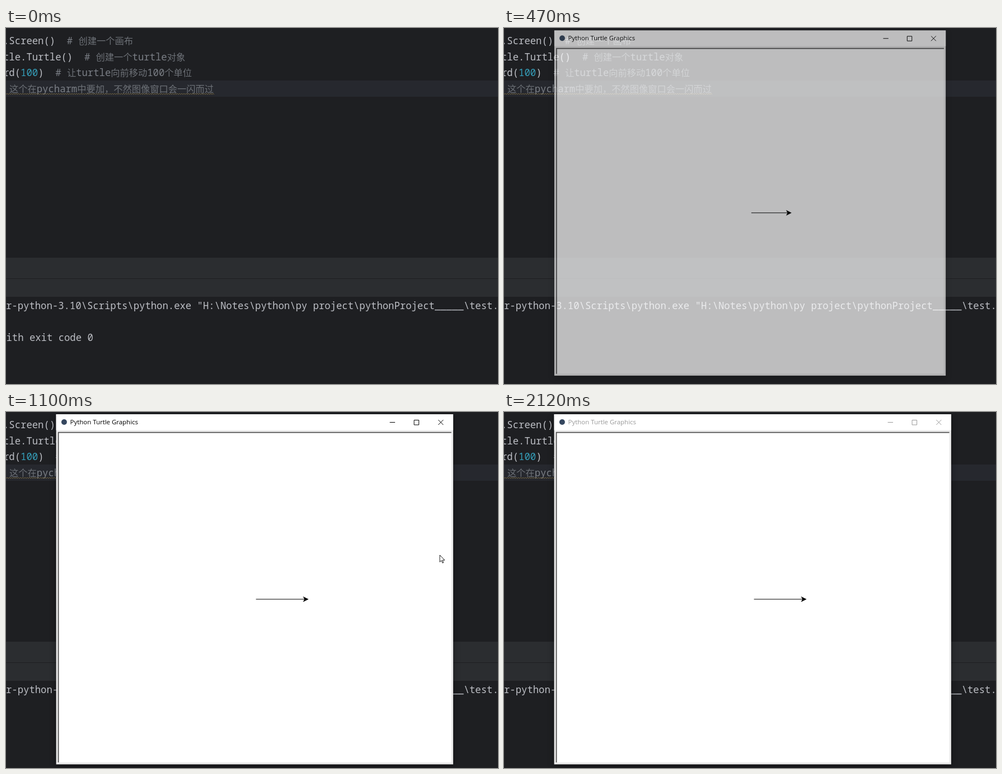
These frames come from a looping animation (879x637 px, 2.19 s). An HTML page:

```html
<!DOCTYPE html>
<html lang="zh">
<head>
<meta charset="utf-8">
<title>Turtle demo</title>
<style>
  html, body { margin: 0; width: 100%; height: 100%; overflow: hidden; background: #1e1f22; }
  svg { display: block; }
  text { white-space: pre; }
  .code { font: 17.25px "Noto Sans Mono", "DejaVu Sans Mono", monospace; fill: #bcbec4; }
  .note { fill: #7a7e85; }
  .zh { font: 300 16.25px "Noto Sans CJK SC", "Noto Sans CJK", sans-serif; fill: #6c7076; }
  .num { fill: #359fba; }
  .title { font: 11.45px "Open Sans", "Noto Sans", sans-serif; }
  #back { filter: drop-shadow(0 4px 6px rgba(0, 0, 0, .4)); }
</style>
</head>
<body>
<svg width="879" height="637" viewBox="0 0 879 637">
  <rect width="879" height="637" fill="#1e1f22"/>
  <rect y="94" width="879" height="29" fill="#26282e"/>
  <rect y="411" width="879" height="70" fill="#2b2d30"/>
  <rect y="448" width="879" height="1" fill="#1e1f22"/>

  <g class="code">
    <text x="-5" y="29">.Screen()  <tspan class="note"># <tspan class="zh">创建一个画布</tspan></tspan></text>
    <text x="-5" y="57.6">tle.Turtle()  <tspan class="note"># <tspan class="zh">创建一个</tspan>turtle<tspan class="zh">对象</tspan></tspan></text>
    <text x="-5" y="86">rd(<tspan class="num">100</tspan>)  <tspan class="note"># <tspan class="zh">让</tspan>turtle<tspan class="zh">向前移动</tspan>100<tspan class="zh">个单位</tspan></tspan></text>
    <text x="6" y="114.7" class="note"><tspan class="zh">这个在</tspan>pycharm<tspan class="zh">中要加，不然图像窗口会一闪而过</tspan></text>
    <text x="0" y="502.6">r-python-3.10\Scripts\python.exe "H:\Notes\python\py project\pythonProject_____\test.py"</text>
    <text x="0.5" y="560" id="exit">ith exit code 0</text>
  </g>
  <path id="wave" fill="none" stroke="#857042" stroke-width=".8"/>

  <g id="win">
    <rect id="back" width="709.3" height="626.5" fill="#ececec"/>
    <rect width="709.3" height="28.5" fill="#fff"/>
    <rect x="4" y="33" width="702" height="590" fill="#fff"/>
    <path d="M706 32.6H4V623" fill="none" stroke="#505050" stroke-width="1.7"/>
    <circle cx="14.3" cy="14" r="5" fill="#35475f"/>
    <text id="title" class="title" x="25" y="18">Python Turtle Graphics</text>
    <path id="buttons" d="M596 14.5h9.5M639.5 10.5h8.5v8.5h-8.5zM682.7 10l9 9m0 -9l-9 9" fill="none"/>
    <path id="line" stroke="#000" stroke-width="1.1"/>
    <path id="head" d="M0 0L-10 -5L-7.5 0L-10 5Z"/>
  </g>

  <path id="cursor" d="M0 0V12.4L2.9 9.7L4.9 14.2L6.7 13.4L4.8 9.1H8.8Z" fill="#fff" stroke="#000" stroke-width=".9"/>
</svg>
<script>
const LOOP = 2190, OPEN = 400, BLUR = 2120;
const el = id => document.getElementById(id);
const set = (id, attrs) => {
  for (const k in attrs) el(id).setAttribute(k, attrs[k]);
};
const show = (id, on) => set(id, { visibility: on ? 'visible' : 'hidden' });

// Pointer path: time, x, y
const path = [
  [880, 820, 301], [953, 797, 280], [1100, 775, 256], [1380, 774, 88],
  [1450, 773, 42], [1520, 780, 80], [1590, 804, 210], [1660, 848, 422]
];

function pointAt(t) {
  const i = Math.max(1, path.findIndex(p => p[0] >= t));
  const [a, b] = [path[i - 1], path[i]];
  const k = Math.max(0, (t - a[0]) / (b[0] - a[0]));
  return [a[1] + (b[1] - a[1]) * k, a[2] + (b[2] - a[2]) * k];
}

function drawWindow(t) {
  show('win', t >= OPEN);
  if (t < OPEN) return;
  const n = Math.floor((t - OPEN) / 70);
  const rest = n < 4 ? 0.64 * 0.46 ** n : 0;   // how much of the fade-in remains
  const scale = 1 - 0.048 * rest;
  set('win', {
    opacity: 1 - rest,
    transform: `translate(${89.6 + rest} ${4 + 1.5 * rest}) scale(${scale})`
  });
  const tip = 357 + Math.min(94, 22 + 51 * n);
  set('line', { d: `M357 331H${tip - 7}` });
  set('head', { transform: `translate(${tip} 331)` });
  const ink = t < BLUR ? '#000' : '#999';
  set('title', { fill: ink });
  set('buttons', { stroke: ink });
}

function drawCursor(t) {
  const on = t >= 880 && t < 1730;
  show('cursor', on);
  if (!on) return;
  const step = t < 1100 ? 220 / 3 : 70;
  const [x, y] = pointAt(1100 + Math.floor((t - 1100) / step) * step);
  set('cursor', { transform: `translate(${x} ${y})` });
}

function frame(now) {
  const t = now % LOOP;
  show('exit', t < 200);
  drawWindow(t);
  drawCursor(t);
  requestAnimationFrame(frame);
}

set('wave', { d: 'M0 119' + 'l2 -2l2 2'.repeat(93) });
frame(0);
</script>
</body>
</html>
```
